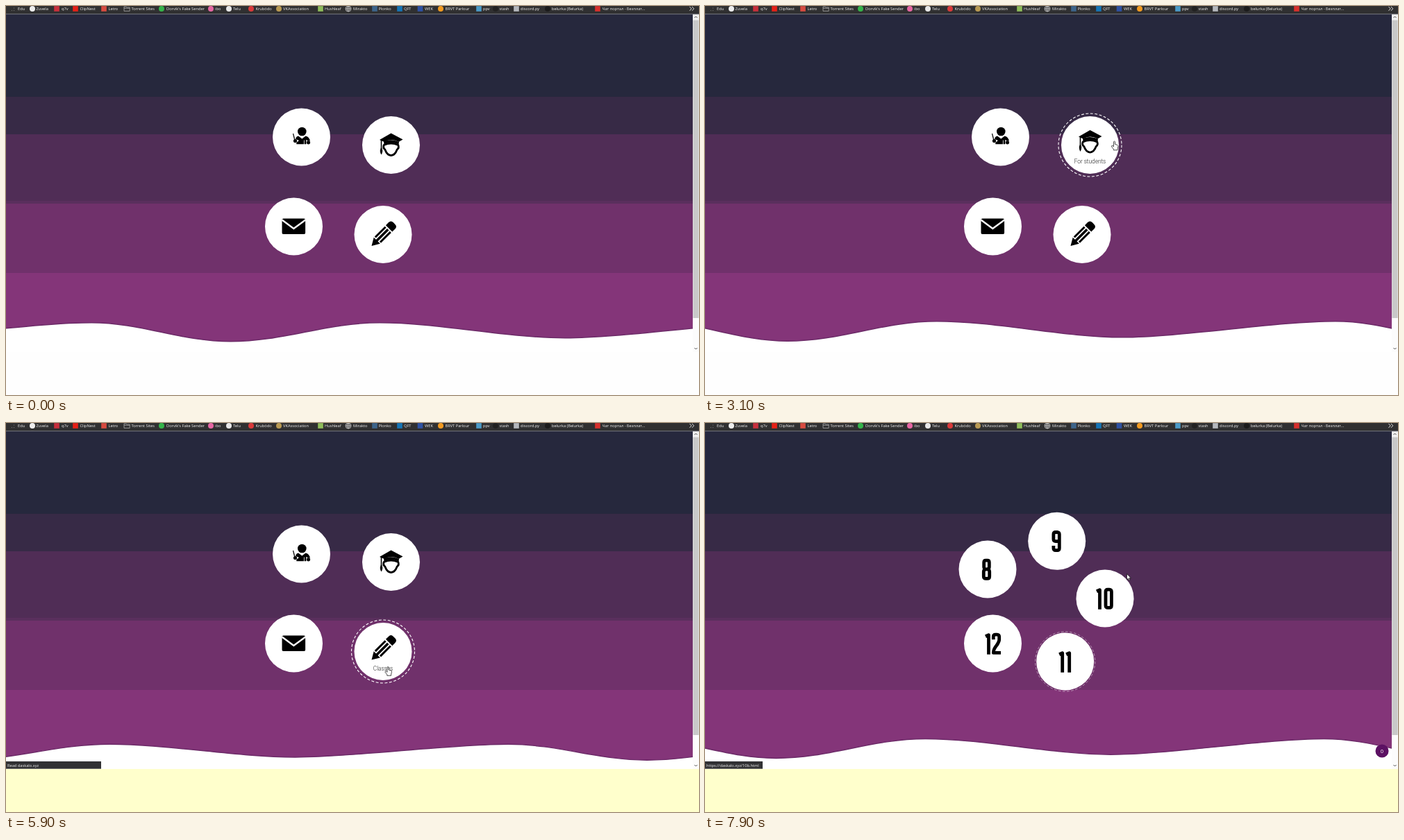
An HTML page for the animation above (8000 ms loop, 998 by 561 pixels).

```html
<!DOCTYPE html>
<html lang="en">
<head>
<meta charset="utf-8">
<title>Class menu</title>
<style>
html, body { margin: 0; width: 100%; height: 100%; overflow: hidden; background: #fefefe; }
svg { display: block; width: 998px; height: 561px; }
.ui { font: 5.7px "Open Sans", "Noto Sans", sans-serif; fill: #f2f2f2; }
.label { font: 300 8.25px Roboto, sans-serif; fill: #222; text-anchor: middle; }
.ring { fill: none; stroke: #fff; }
.digits { fill: none; stroke: #000; stroke-width: 4.8; stroke-linejoin: round; }
</style>
</head>
<body>
<svg id="stage" viewBox="0 0 998 561">
  <rect id="below" y="498" width="998" height="63" fill="#fefefe"/>
  <g id="stripes"></g>
  <g id="wave">
    <path id="foam" fill="#fff"/>
    <path id="crest" fill="none" stroke="#6c2a68" stroke-width="1.5" vector-effect="non-scaling-stroke"/>
  </g>
  <g id="menu"></g>
  <path id="glint" d="M497 179.5H516Q507 188 497 179.5Z" fill="#4a2a50"/>
  <g id="numbers"></g>
  <g id="badge">
    <circle cx="975" cy="473" r="9.5" fill="#5c1163"/>
    <text id="count" x="975" y="475.8" text-anchor="middle" fill="#fff" style="font:7.5px 'Open Sans',sans-serif">0</text>
  </g>
  <rect x="989" y="12" width="9" height="487" fill="#f1f1f1"/>
  <rect x="989" y="450" width="9" height="49" fill="#fcfcfc"/>
  <rect x="989.5" y="20.5" width="8" height="429.5" fill="#c9c9c9"/>
  <path d="M991.5 17L993.5 15L995.5 17M991.5 493L993.5 495L995.5 493" fill="none" stroke="#505050"/>
  <rect width="998" height="11.5" fill="#303031"/>
  <rect y="11.2" width="998" height="1" fill="#62636c"/>
  <g id="bar" class="ui"></g>
  <path d="M984.5 1L987.2 3.9L984.5 6.8M988 1L990.7 3.9L988 6.8" fill="none" stroke="#ddd"/>
  <g id="status">
    <rect id="statusBox" y="488" height="10.7" fill="#323234"/>
    <text id="statusText" class="ui" x="2" y="495.8"></text>
  </g>
  <path id="cursor" fill="#fff" stroke="#111" stroke-width=".75" stroke-linejoin="round"/>
</svg>
<script>
const LOOP = 8, PAGE_TWO = 6.4, TILE = 989, RADIUS = 41.5;
const $ = id => document.getElementById(id);
const set = (el, attrs) => { for (const k in attrs) el.setAttribute(k, attrs[k]); return el; };
const add = (parent, tag, attrs) =>
  parent.appendChild(set(document.createElementNS('http://www.w3.org/2000/svg', tag), attrs));
const show = (el, on) => { el.style.display = on ? '' : 'none'; };
const clamp = x => Math.max(0, Math.min(1, x));
const mix = (a, b, k) => a + (b - a) * k;
const smooth = k => k * k * (3 - 2 * k);

// Background
[[12, 131, '#26283d'], [131, 185, '#372a46'], [185, 281, '#502d56'], [281, 285, '#5a2f5d'],
 [285, 385, '#70316b'], [385, 499, '#843579']].forEach(([y, end, fill]) =>
  add($('stripes'), 'rect', { y, width: TILE, height: end - y, fill }));

// Bookmarks: icon x, text x, name, icon colour, shape
[[11, 17, 'Edu', '#777', 'dot'], [38, 43.5, 'Zuvela', '#eee', 'o'], [73, 80, 'q7v', '#c8303c', 's'],
 [100, 106.5, 'ClipNest', '#e62117', 's'], [141, 147.5, 'Letro', '#d84b40', 's'],
 [174, 180.5, 'Torrent Sites', '#aaa', 'folder'], [224, 231, "Dorvik's Fake Sender", '#35b44a', 'o'],
 [295, 301, 'ibo', '#e667a3', 'o'], [321, 327, 'Telu', '#e8e8e8', 'o'], [353, 359.5, 'Krubódo', '#d93a3a', 'o'],
 [393, 399, 'VKAssociation', '#b99a52', 'o'], [453, 459, 'Hushleaf', '#8fbd5a', 's'],
 [493, 500, 'Mirakto', '#ccc', 'globe'], [531, 536.5, 'Plonko', '#3d648a', 's'],
 [567, 573, 'QFT', '#1675b6', 's'], [596.5, 603, 'WEK', '#2e51a2', 's'],
 [626, 632.5, 'BRVT Parlour', '#f29a20', 'o'], [681, 687, 'ppv', '#4b9bc8', 's'],
 [705, 710.5, 'stash', '#222', 'o'], [735, 741, 'discord.py', '#b5b8bd', 's'],
 [780, 786, 'belurka (Belurka)', '#1c1c1c', 'o'], [852, 858.5, 'Чат портал - Безплат...', '#d8302c', 's']
].forEach(([ix, x, name, color, kind]) => {
  const bar = $('bar');
  if (kind === 'o') add(bar, 'circle', { cx: ix, cy: 4, r: 4, fill: color });
  else if (kind === 's') add(bar, 'rect', { x: ix - 3.8, y: .2, width: 7.6, height: 7.6, fill: color });
  else if (kind === 'dot') add(bar, 'path', { d: 'M8 6.5h1M11 6.5h1M11 3h1', stroke: color });
  else add(bar, 'path', {
    d: kind === 'globe'
      ? 'M489 4a4 4 0 1 1 8 0a4 4 0 1 1-8 0H497M493 0V8M493 0q-4 4 0 8q4-4 0-8'
      : 'M170 7.3V1H173L174 2H178.2V7.3ZM170 3.3H178.2',
    fill: 'none', stroke: color, 'stroke-width': .8 });
  add(bar, 'text', { x, y: 6.1 }).textContent = name;
});

// Wave: crests and troughs of one tile, heights above the bottom edge
const knots = [[200, 17.2, .36], [415, 48, .36], [682, 23, .32], [989, 48, .28]];
let curve = `M${-TILE} -48`, px = -TILE, py = 48;
for (let n = -1; n < 2; n++) for (const [kx, ky, bend] of knots) {
  const x = kx + n * TILE, h = (x - px) * bend;
  curve += `C${px + h} ${-py} ${x - h} ${-ky} ${x} ${-ky}`;
  px = x; py = ky;
}
set($('crest'), { d: curve });
set($('foam'), { d: curve + `V0H${-TILE}Z` });

// Menu icons, drawn around the centre of their circle
const icons = {
  teacher: `<circle cx=".8" cy="-8" r="6.3"/>
    <path d="M-8.5 3Q-8-1-4.5-1.5L.8 2.5L6-1.5Q11-.5 12.5 5.5L9 5.5L6.8 3.8V10.2H4.2V4.5H3.4V10.2H-7.2V8L-3.5 5Z"/>
    <circle cx="-9" cy="5.5" r="2.6"/><circle cx="10" cy="7.8" r="2.6"/>
    <path d="M-12-5L-9.3 5.5" stroke="#000" stroke-width="1.2"/>`,
  student: `<path d="M-16.5-7.5L0-17L17-8L11-4.5Q0-10.5-10-4.5Z"/>
    <path d="M-10.5-5Q0-9.5 11.5-4.5L11-.8Q0-5.5-10-.8Z"/>
    <path d="M-10.3 0Q-12 4-8.7 6.5Q-5.5 15 0 15Q5.5 15 8.7 6.5Q12 4 10.3 0Q0-5-10.3 0Z" fill="none" stroke="#000" stroke-width="2.8"/>
    <path d="M-14-8V5" stroke="#000" stroke-width="1.6"/><path d="M-14 3Q-10.5 8-14 14Q-17.5 8-14 3Z"/>`,
  mail: `<rect x="-17" y="-11.5" width="33.6" height="22.6" rx="2.2"/>
    <path d="M-17-9.5L-.2 3L16.8-9.5" fill="none" stroke="#fff" stroke-width="2.4"/>`,
  pencil: `<g transform="translate(-16.5 16.5)rotate(-45)"><path d="M0 0L11-6.5V6.5Z"/>
    <path d="M12.5-6.6H33.5V-3.6H12.5ZM10.5-1.8H33.5V1.8H10.5ZM12.5 3.6H33.5V6.6H12.5Z"/>
    <path d="M35.5-6.6H41Q46-6.6 46-2V2Q46 6.6 41 6.6H35.5Z"/></g>`
};

function disc(parent, x, y) {
  const g = add(parent, 'g', {});
  const ring = add(g, 'circle', { class: 'ring' });
  add(g, 'circle', { r: RADIUS, fill: '#fff' });
  return { g, ring, x, y };
}

// Hover progress over 0.3 s on both sides of an interval
const hoverAt = (t, [from, to]) => smooth(clamp((t - from) / .3)) * (1 - smooth(clamp((t - to) / .3)));

function drawRing(ring, k) {
  const r = RADIUS + 4 * k, dash = 2 * Math.PI * r / 44;
  set(ring, { r, opacity: Math.min(1, k * 1.6), 'stroke-width': .5 + .6 * k,
    'stroke-dasharray': `${dash * .6} ${dash * .4}` });
}

const menu = [
  ['teacher', 425.5, 189, [.5, 2], 'For teachers', 27.5],
  ['student', 554.5, 200.5, [2.75, 3.2], 'For students', 26],
  ['mail', 414.5, 318, [99, 99], '', 27],
  ['pencil', 543, 329.5, [4.2, 7], 'Classes', 27.3]
].map(([icon, x, y, hover, label, drop]) => {
  const item = disc($('menu'), x, y);
  set(item.g, { transform: `translate(${x} ${y})` });
  item.icon = add(item.g, 'g', {});
  item.icon.innerHTML = icons[icon];
  item.text = add(item.g, 'text', { class: 'label', y: drop });
  item.text.textContent = label;
  return Object.assign(item, { hover });
});

// Condensed numerals as strokes
const glyphs = {
  0: 'M-4.2-10Q-4.2-13.1-1.2-13.1H1.2Q4.2-13.1 4.2-10V10Q4.2 13.1 1.2 13.1H-1.2Q-4.2 13.1-4.2 10Z',
  1: 'M-4.5-10.6L0-12.6V15.5',
  2: 'M-4.2-6V-10Q-4.2-13.1-1.2-13.1H1.2Q4.2-13.1 4.2-10V-6Q4.2-3 .8 2Q-4.2 8-4.2 13.1H6.5',
  8: 'M-3.8-10.3Q-3.8-13.1-1.2-13.1H1.2Q3.8-13.1 3.8-10.3V-3.5Q3.8-.5 0-.5Q-3.8-.5-3.8-3.5Z' +
     'M0-.5Q4.2-.5 4.2 3V10Q4.2 13.1 1.2 13.1H-1.2Q-4.2 13.1-4.2 10V3Q-4.2-.5 0-.5',
  9: 'M4.2 0H-1.2Q-4.2 0-4.2-3V-10Q-4.2-13.1-1.2-13.1H1.2Q4.2-13.1 4.2-10V10Q4.2 13.1 1.2 13.1H-1.2Q-4.2 13.1-4.2 10V6.5'
};
const numbers = [
  ['8', 407, 211, [-1.5]], ['9', 506.7, 170.3, [-.6]], ['10', 576, 253, [-7.5, 5.2]],
  ['11', 518.7, 344, [-4, 6]], ['12', 414.5, 318, [-6, 5]]
].map(([label, x, y, offsets]) => {
  const item = disc($('numbers'), x, y);
  const g = add(item.g, 'g', { class: 'digits', role: 'img', 'aria-label': label });
  offsets.forEach((dx, i) => add(g, 'path', { d: glyphs[label[i]], transform: `translate(${dx} .3)` }));
  return item;
});
const elevenHover = [6.75, 7.73];

// Bouncing entrance
const bounceKeys = [.3, 1.1, .9, 1.03, .97, 1];
function bounce(p) {
  if (p >= 1) return 1;
  const i = Math.floor(p * 5), k = 1 - (1 - (p * 5 - i)) ** 3;
  return mix(bounceKeys[i], bounceKeys[i + 1], k);
}

// Pointer: time, x, y of the tip
const track = [[.2, 455, 119], [.5, 433, 188], [1.85, 433, 188], [2.15, 478, 137], [2.4, 515, 137],
  [2.6, 560, 112], [2.9, 589.5, 195], [3.1, 589.5, 195], [3.35, 612, 112], [3.5, 612, 120],
  [4, 592, 270], [4.3, 550, 351.5], [6, 550, 351.5], [6.5, 548, 337.5], [7.5, 548, 337.5],
  [7.75, 612, 300], [7.82, 627, 250], [7.9, 607.5, 217.5]];
const HAND = 'M-1 .7Q0-.7 1 .7V4.4L4.4 5.4Q5.7 5.9 5.4 8L4.5 11.3V12.8H-1.2V11.3L-4 7.8Q-4.1 6-2.5 6.5L-1 7.8Z';
const ARROW = 'M0 0V8.4L1.9 6.7L3.2 9.7L4.6 9.1L3.3 6.3H5.9Z';

function pointer(t) {
  const i = track.findIndex(p => p[0] > t);
  if (i < 0) return track[track.length - 1].slice(1);
  const [a, ax, ay] = track[Math.max(0, i - 1)], [b, bx, by] = track[i];
  const k = b > a ? smooth(clamp((t - a) / (b - a))) : 0;
  return [mix(ax, bx, k), mix(ay, by, k)];
}

// Status line: from, to, text, box width
const site = 'https://daskalo.xyz/';
const notes = [[.5, 2.1, site + '#', 62], [4.3, 5.3, site + 'classes.html', 92],
  [5.3, PAGE_TWO, 'Read daskalo.xyz', 137], [6.7, LOOP, site + '10b.html', 83]];

function draw(t) {
  const second = t >= PAGE_TWO;

  const age = (second ? t - 4.55 : t) - 1.87;
  const shift = ((-age * TILE / 15) % TILE + TILE) % TILE;
  const height = 48 - 3.05 * Math.abs(age);
  set($('wave'), { transform: `translate(${shift} 499) scale(1 ${height / 48})` });
  set($('below'), { fill: t < 5.3 ? '#fefefe' : '#ffffcc' });

  show($('menu'), !second);
  show($('numbers'), second);
  show($('badge'), t >= 6.7);
  show($('count'), t >= 7.2);
  show($('glint'), t >= 6.8 && t < 6.9);

  menu.forEach(m => {
    const k = hoverAt(t, m.hover);
    drawRing(m.ring, k);
    set(m.icon, { transform: `translate(0 ${-4.4 * k})` });
    set(m.text, { opacity: k });
  });
  numbers.forEach((n, i) => {
    const p = clamp((t - 6.65 - .15 * i) / .65);
    set(n.g, { transform: `translate(${n.x} ${n.y}) scale(${bounce(p)})`,
      opacity: 1 - (1 - clamp(p / .6)) ** 2 });
    drawRing(n.ring, i === 3 ? hoverAt(t, elevenHover) : 0);
  });

  const note = notes.find(n => t >= n[0] && t < n[1]);
  show($('status'), note);
  if (note) {
    set($('statusBox'), { width: note[3] });
    $('statusText').textContent = note[2];
  }

  const [x, y] = pointer(t);
  const hand = [...menu.map(m => m.hover), elevenHover].some(([a, b]) => t >= a && t < b);
  show($('cursor'), t >= .2);
  set($('cursor'), { d: hand ? HAND : ARROW, transform: `translate(${x} ${y})` });
}

const start = performance.now();
function tick() {
  const ms = (performance.now() - start) % (LOOP * 1000);
  draw(Math.floor(ms / 100) / 10);
  requestAnimationFrame(tick);
}
tick();
</script>
</body>
</html>
```
